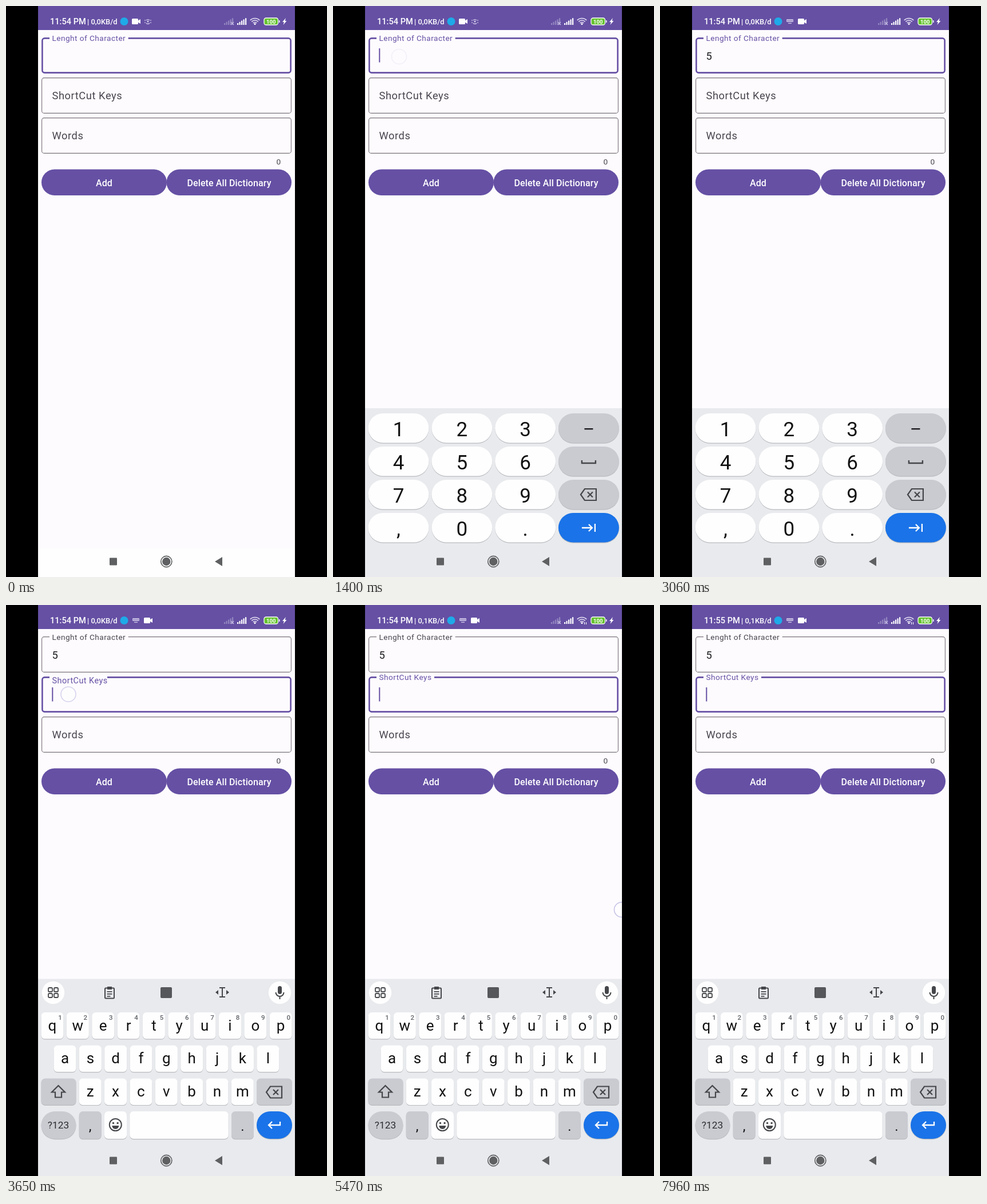
These frames come from a looping animation (561 by 998 pixels, 8000 ms). An HTML page with a canvas:

```html
<!DOCTYPE html>
<html lang="en">
<head>
<meta charset="utf-8">
<style>
  html, body { margin: 0; width: 100%; height: 100%; overflow: hidden; background: #000; }
  canvas { display: block; width: 561px; height: 998px; }
</style>
</head>
<body>
<canvas id="stage" width="561" height="998"></canvas>
<script>
const ctx = document.getElementById('stage').getContext('2d');
const LOOP = 8000;
const PURPLE = '#6550a4', INK = '#1c1b1f', GREY = '#49454f', PAPER = '#fefbfe';
const PANEL = '#e8eaed', KEY = '#fefefe', MODIFIER = '#cacbd1', BLUE = '#1a73e8', ICON = '#444649';

const clamp = v => Math.max(0, Math.min(1, v));
const easeOut = v => 1 - (1 - clamp(v)) ** 3;
const mix = (a, b, p) => a + (b - a) * p;
const within = (t, spans) => spans.some(([from, to]) => t >= from && t < to);

function rect(x, y, w, h, fill) {
  ctx.fillStyle = fill;
  ctx.fillRect(x, y, w, h);
}
function box(x, y, w, h, r, fill, stroke, width = 1) {
  ctx.beginPath();
  ctx.roundRect(x, y, w, h, r);
  paint(fill, stroke, width);
}
function circle(x, y, r, fill, stroke, width = 1) {
  ctx.beginPath();
  ctx.arc(x, y, r, 0, Math.PI * 2);
  paint(fill, stroke, width);
}
function path(d, fill, stroke, width = 2, x = 0, y = 0) {
  ctx.save();
  ctx.translate(x, y);
  const p = new Path2D(d);
  if (fill) { ctx.fillStyle = fill; ctx.fill(p); }
  if (stroke) { ctx.strokeStyle = stroke; ctx.lineWidth = width; ctx.stroke(p); }
  ctx.restore();
}
function paint(fill, stroke, width) {
  if (fill) { ctx.fillStyle = fill; ctx.fill(); }
  if (stroke) { ctx.strokeStyle = stroke; ctx.lineWidth = width; ctx.stroke(); }
}
function text(s, x, y, size, color, { weight = 400, align = 'left', spacing = 0 } = {}) {
  ctx.font = `${weight} ${size}px Roboto, sans-serif`;
  ctx.letterSpacing = spacing + 'px';
  ctx.textAlign = align;
  ctx.fillStyle = color;
  ctx.fillText(s, x, y);
}

function signal(x, color, missing) {
  for (let i = 0; i < 5; i++) {
    const h = 3 + i * 2.2;
    rect(x + i * 3.5, 33 - h, 2.2, h, color);
  }
  if (missing) path('M0 0l5 5m0-5l-5 5', null, '#c5bbe3', 1.3, x + 12, 28);
}

function statusBar(t) {
  rect(56, 0, 449, 42, PURPLE);
  text(t < 5800 ? '11:54 PM' : '11:55 PM', 77, 32, 14.6, '#fff', { weight: 500 });
  text(`| ${t < 5200 ? '0,0' : '0,1'}KB/d`, 142, 32, 12.9, '#fff', { weight: 500 });
  circle(206.5, 27, 7, '#1eaae8');

  const typing = t >= 1790;
  const cam = typing ? 241 : 220;
  box(cam, 22, 11, 10, 1.5, '#fff');
  path('M10 4l5-3v8l-5-3z', '#fff', null, 1, cam, 22);
  if (typing) {
    box(221, 23, 12, 5, 1, '#c2b9df');
    for (let i = 0; i < 4; i++) rect(222.5 + i * 2.6, 25, 1.2, 1.2, PURPLE);
    rect(224, 29.5, 6, 1.5, '#c2b9df');
  } else {
    path('M-3-2a4 4 0 0 1 6 0M-3 3a4 4 0 0 0 6 0M-5-3v2m10-2v2M-5 3v-2m10 2v-2', null, '#d5cdea', 1.2, 248, 27);
    circle(248, 27, 1.6, '#d5cdea');
  }

  signal(381, '#9385bf', true);
  signal(404, '#fff');
  for (const r of [4.5, 8, 11.5]) {
    ctx.beginPath();
    ctx.arc(435, 33, r, Math.PI * 1.25, Math.PI * 1.75);
    paint(null, '#e6e0f3', 1.7);
  }
  circle(435, 31.5, 1.6, '#fff');
  if (t >= 5200) path('M0 0v4m3-4v4', null, '#fff', 1.1, 439.5, 30);
  box(451, 21, 24.5, 12, 3.5, '#65c32f', '#fff', 1.3);
  rect(477, 25, 1.5, 4, '#fff');
  text('100', 463.2, 30.6, 9.5, '#fff', { weight: 700, align: 'center' });
  path('M4 0l-6 7h3l-1.5 5 6-7h-3z', '#fff', null, 1, 485, 21);
}

// Outlined field; "float" moves the label from the middle (0) onto the border (1).
function field(y, label, focused, float, value = '') {
  const w = focused ? 2.6 : 1.1, inset = focused ? 1.4 : .6;
  const color = focused ? PURPLE : '#77737a';
  box(62 + inset, y + inset, 437 - 2 * inset, 63 - 2 * inset, 4, null, color, w);
  const size = mix(18.3, 13.7, float);
  if (float > 0) {
    ctx.font = '400 13.7px Roboto, sans-serif';
    ctx.letterSpacing = '.43px';
    rect(76, y - 1, ctx.measureText(label).width + 9, 5, PAPER);
  }
  text(label, 80.5, mix(y + 38, y + 6.3, float), size, focused ? PURPLE : GREY, { spacing: size / 32 });
  text(value, 80.5, y + 39, 18.3, INK);
}

function form(t) {
  const second = t >= 3540;
  const float = easeOut((t - 3575) / 170);
  const typed = t >= 2480;
  field(55, 'Lenght of Character', !second, 1, typed ? '5' : '');
  field(125, 'ShortCut Keys', second, float);
  field(195, 'Words', false, 0);
  text('0', 472.5, 277, 13.7, GREY);
  box(62, 285.5, 219, 45.5, 22.7, PURPLE);
  box(280.5, 285.5, 218.5, 45.5, 22.7, PURPLE);
  text('Add', 171.5, 314.5, 16, '#fff', { weight: 500, align: 'center', spacing: .1 });
  text('Delete All Dictionary', 390, 314.5, 16, '#fff', { weight: 500, align: 'center', spacing: .1 });

  const firstCaret = [[340, 840], [1000, 1500], [2000, 2990]];
  const secondCaret = [[3540, 4130], [4530, 4990], [5200, 6170], [6950, 7460], [7870, LOOP]];
  if (within(t, firstCaret)) rect(typed ? 91.5 : 80.3, 74, 2, 24.5, PURPLE);
  if (within(t, secondCaret)) rect(80.3, 144, 2, 24.5, PURPLE);
}

function key(x, y, w, h, r, fill = KEY) {
  box(x, y + 1.2, w, h, r, '#b9bbc0');
  box(x, y, w, h, r, fill);
}
function backspace(x, y) {
  path('M-14 0l7-10h20v20h-20zM-2-4.5l9 9m0-9l-9 9', null, ICON, 2.2, x, y);
}

function numberPad(t) {
  rect(56, 703, 449, 300, PANEL);
  '123-456_789<,0.>'.split('').forEach((c, i) => {
    const col = i % 4, x = 61.5 + col * 110.8, y = 712 + Math.floor(i / 4) * 58;
    const cx = x + 53, cy = y + 26;
    const pressed = c === '5' && t >= 2380 && t < 2520;
    key(x, y, 106, 51.5, 25.8, c === '>' ? BLUE : col === 3 ? MODIFIER : pressed ? '#d5d7db' : KEY);
    if (c === '-') rect(cx - 7.5, cy, 15, 2.4, INK);
    else if (c === '_') path('M-12-3v5h24v-5', null, ICON, 2.4, cx, cy + 1);
    else if (c === '<') backspace(cx, cy);
    else if (c === '>') path('M-12 0h18M0-6l6 6-6 6M11-7v14', null, '#fff', 2.3, cx, cy);
    else text(c, cx, y + 39.5, 35, '#111', { align: 'center' });
  });
}

function toolbar() {
  circle(82.5, 677.5, 19.7, KEY);
  for (const dx of [-8.5, 1.5]) for (const dy of [-8.5, 1.5])
    box(82.5 + dx, 677.5 + dy, 7, 7, 1.8, null, ICON, 1.8);
  box(173, 669.5, 16, 18, 1.5, null, ICON, 2);
  rect(177, 667, 8, 5, ICON);
  for (const y of [675, 679, 683]) rect(176.5, y, y === 683 ? 6 : 9, 1.7, ICON);
  box(270, 668, 20, 19, 2, '#55575b');
  path('M-5-8h10M-5 8h10M0-8v16', null, ICON, 2, 378, 677);
  path('M-7-4v8l-5-4zM7-4v8l5-4z', ICON, null, 1, 378, 677);
  circle(478.5, 677.5, 19.7, KEY);
  box(475, 666, 7, 14, 3.5, ICON);
  path('M-7 0a7 7 0 0 0 14 0M0 7v5', null, ICON, 2, 478.5, 677);
}

function letterBoard() {
  rect(56, 653.5, 449, 350, PANEL);
  toolbar();
  const pitch = 44.35;
  [['qwertyuiop', 81], ['asdfghjkl', 103], ['zxcvbnm', 147.2]].forEach(([letters, start], row) => {
    const y = 712 + row * 57.8;
    [...letters].forEach((c, i) => {
      const cx = start + i * pitch;
      key(cx - 19.5, y, 39, 46.3, 6.5);
      text(c, cx, y + 31.5, 26, '#111', { align: 'center' });
      if (!row) text((i + 1) % 10, cx + 13.5, y + 12.5, 11.5, '#5f6368', { weight: 500, align: 'center' });
    });
  });
  key(61.5, 827.5, 61, 46.3, 7, MODIFIER);
  path('M0-11l-11.5 11.5h6v9h11v-9h6z', null, ICON, 2.2, 91.5, 851);
  key(438, 827.5, 62, 46.3, 7, MODIFIER);
  backspace(469, 851.5);

  key(61.5, 885, 61, 48, 24, MODIFIER);
  text('?123', 91.5, 915, 17.3, '#2b2d30', { align: 'center' });
  key(127.7, 885, 39, 48, 6.5, MODIFIER);
  text(',', 147.2, 919, 24, '#111', { align: 'center' });
  key(172, 885, 39, 48, 6.5);
  circle(191.3, 908.5, 10.5, null, ICON, 2);
  circle(187.5, 905.5, 1.7, ICON);
  circle(195.1, 905.5, 1.7, ICON);
  path('M-6 0h12a6 6 0 0 1-12 0z', ICON, null, 1, 191.3, 910);
  key(216.2, 885, 172.5, 48, 6.5);
  key(394, 885, 39, 48, 6.5, MODIFIER);
  text('.', 413.5, 919, 24, '#111', { align: 'center' });
  key(438, 885, 62, 48, 24, BLUE);
  path('M10-6v6h-20M-4-6l-6 6 6 6', null, '#fff', 2.3, 469, 909);
}

function keyboard(t) {
  if (t < 1120) return;
  if (t >= 3580) return letterBoard();
  ctx.save();
  ctx.translate(0, 295 * (1 - easeOut((t - 1120) / 260)));
  numberPad(t);
  ctx.restore();
}

function navigation() {
  box(181, 964.5, 13, 13, 1, '#5f6062');
  circle(280.3, 971, 9.6, null, '#5f6062', 1.6);
  circle(280.3, 971, 7.2, '#5f6062');
  path('M365 971l13-8v16z', '#5f6062');
}

function touch(t, x, y, start, hold, fade) {
  if (t < start) return;
  ctx.globalAlpha = 1 - clamp((t - start - hold) / fade);
  circle(x, y, 13, 'rgba(255,255,255,.6)', '#c6c2e6', 1.6);
  ctx.globalAlpha = 1;
}

function draw(t) {
  rect(0, 0, 561, 998, '#000');
  ctx.save();
  ctx.beginPath();
  ctx.rect(56, 0, 449, 998);
  ctx.clip();
  rect(56, 0, 449, 998, PAPER);
  rect(56, 948, 449, 50, '#fdfefd');
  statusBar(t);
  form(t);
  keyboard(t);
  navigation();
  touch(t, 115.5, 88.5, 1000, 100, 380);
  touch(t, 225, 797, 2380, 120, 320);
  touch(t, 109, 156, 3430, 110, 380);
  touch(t, 504.5, 532.5, 5400, 150, 400);
  ctx.restore();
}

function tick() {
  draw(performance.now() % LOOP);
  requestAnimationFrame(tick);
}
tick();
</script>
</body>
</html>
```
